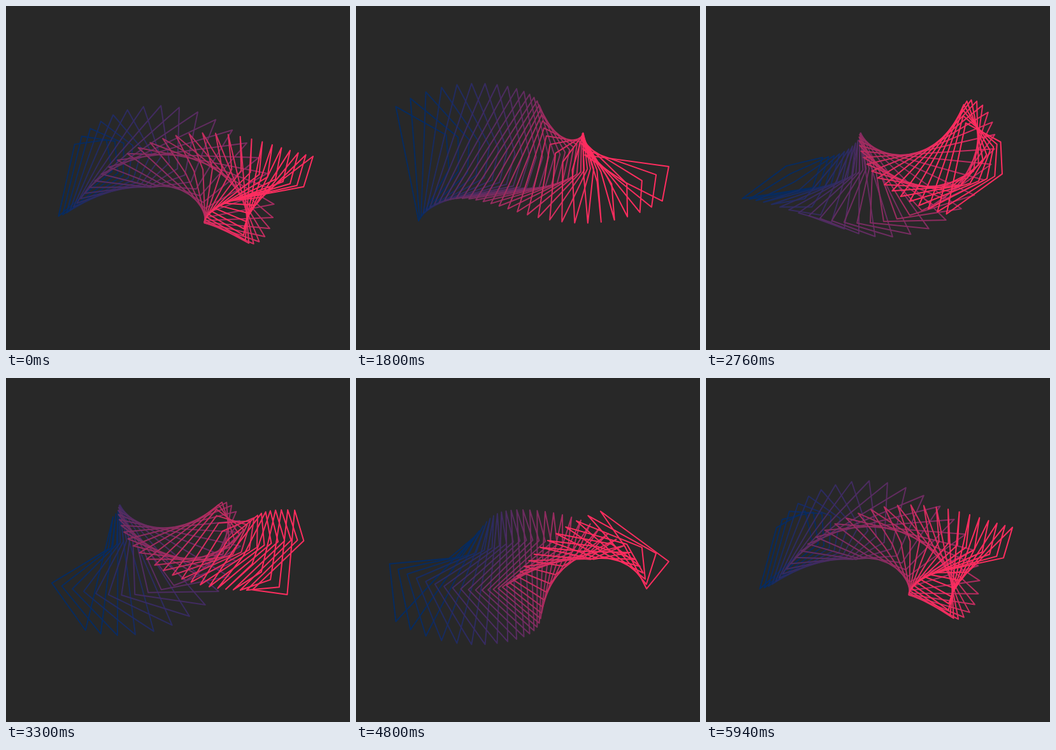
Animation of 540 by 540 pixels, one loop 6000 ms. Source, as an HTML page with a canvas:

```html
<!DOCTYPE html>
<html lang="en">
<head>
<meta charset="utf-8">
<title>Twisting ribbon</title>
<style>
  html, body { margin: 0; width: 100%; height: 100%; overflow: hidden; background: #282828; }
  canvas { display: block; width: 540px; height: 540px; }
</style>
</head>
<body>
<canvas id="stage" width="540" height="540"></canvas>
<script>
const ctx = document.getElementById('stage').getContext('2d');
const TAU = Math.PI * 2;
const STEP_MS = 60, STEPS = 100;
const COUNT = 31, SPACING = 10, CENTER = 270;
const PHASE_PER_PX = 76 / 150 * Math.PI / 180;
const BLUE = [6, 43, 96], RED = [255, 45, 95];

function shade(t) {
  const k = Math.min(1, Math.max(0, (t - 0.05) * 1.3));
  return `rgb(${BLUE.map((c, n) => Math.round(c + (RED[n] - c) * k))})`;
}

function drawQuad(index, time) {
  const offset = (index - (COUNT - 1) / 2) * SPACING;
  const phase = offset * PHASE_PER_PX;
  const swing = Math.sin(time + phase);
  const reach = 150 * Math.cos(2 * time + phase);

  ctx.save();
  ctx.translate(CENTER + offset, CENTER);
  ctx.rotate(0.6 * Math.PI * swing);
  ctx.beginPath();
  ctx.moveTo(-50, -50);
  ctx.lineTo(0, -50 * swing);
  ctx.lineTo(50, 50);
  ctx.lineTo(reach, 0);
  ctx.closePath();
  ctx.strokeStyle = shade(index / (COUNT - 1));
  ctx.stroke();
  ctx.restore();
}

function render(now) {
  const step = Math.floor(now / STEP_MS) % STEPS;
  const time = TAU * (step + 1) / STEPS;
  ctx.fillStyle = '#282828';
  ctx.fillRect(0, 0, 540, 540);
  ctx.lineWidth = 2;
  ctx.lineJoin = 'round';
  for (let i = 0; i < COUNT; i++) drawQuad(i, time);
}

let start;
function tick(now) {
  start ??= now;
  render(now - start);
  requestAnimationFrame(tick);
}
render(0);
requestAnimationFrame(tick);
</script>
</body>
</html>
```
